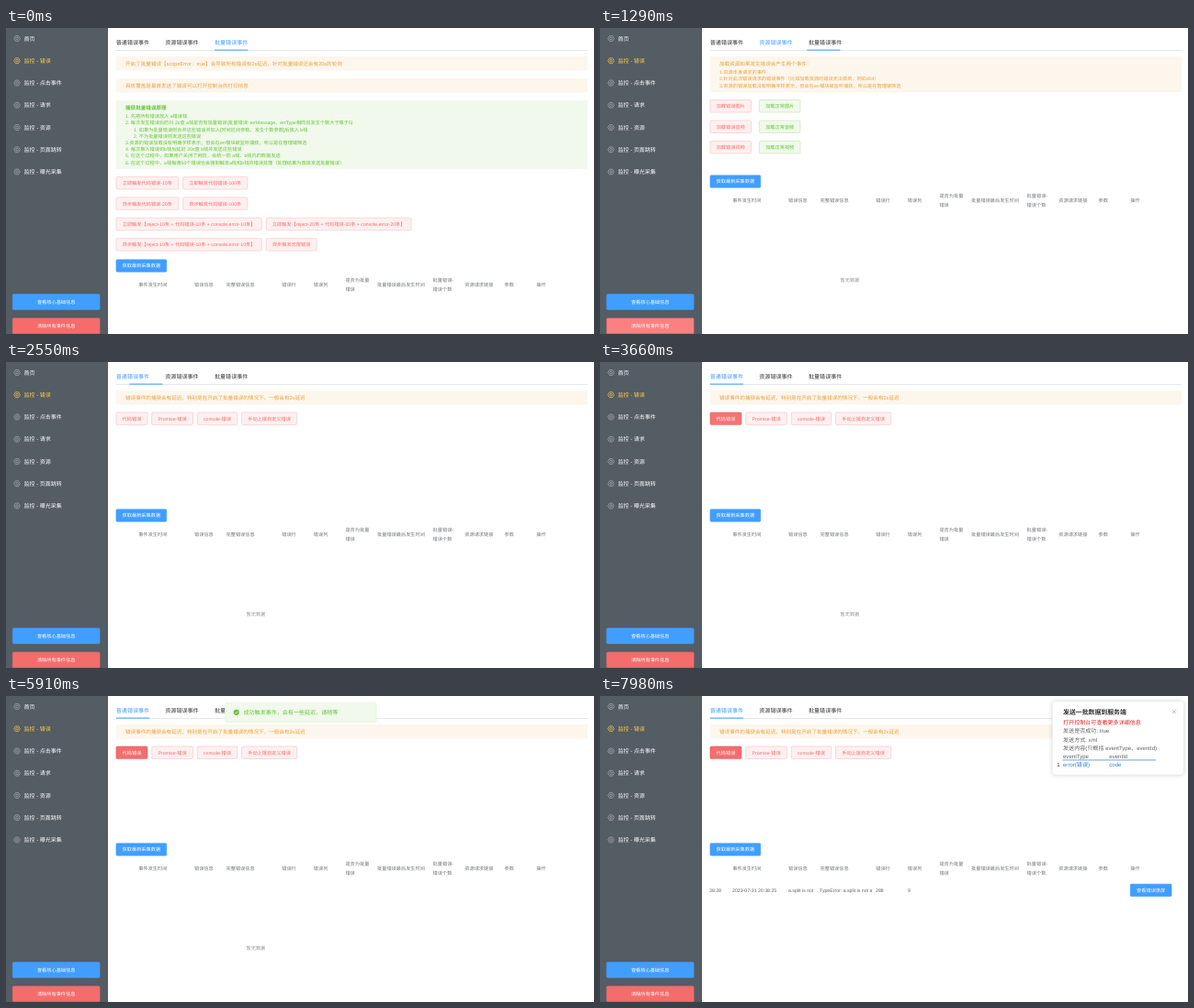
An HTML page that plays this animation: 640x334 px, repeating every 8000 ms.

```html
<!DOCTYPE html>
<html>
<head>
<meta charset="utf-8">
<style>
html, body { margin: 0; width: 100%; height: 100%; overflow: hidden; background: #fff; }
svg { display: block; width: 100vw; height: 100vh; }
text { font-family: "Liberation Sans", "Noto Sans CJK SC", "Noto Sans CJK", sans-serif; text-rendering: geometricPrecision; white-space: pre; }
</style>
</head>
<body>
<svg id="stage" viewBox="0 0 640 334"></svg>
<script>
const LOOP = 8000;
const BLUE = '#409eff', RED = '#f56c6c', GREEN = '#67c23a', ORANGE = '#e6a23c', DARK = '#303133', GREY = '#73767a';
const SMALL = 5.2, BODY = 5.58, MENU = 6;
const stage = document.getElementById('stage');

function add(parent, tag, attrs, content) {
  const node = document.createElementNS('http://www.w3.org/2000/svg', tag);
  for (const key in attrs) node.setAttribute(key, attrs[key]);
  if (content !== undefined) node.textContent = content;
  parent.appendChild(node);
  return node;
}
const group = (parent, attrs = {}) => add(parent, 'g', attrs);
const rect = (parent, x, y, width, height, fill, more = {}) =>
  add(parent, 'rect', { x, y, width, height, fill, ...more });

// y is the visual middle of the line
function label(parent, x, y, content, size, fill, more = {}) {
  return add(parent, 'text', { x, y: y + size * 0.37, 'font-size': size, fill, ...more }, content);
}

const KINDS = {
  primary: [BLUE, BLUE, '#fff'],
  danger: [RED, RED, '#fff'],
  plainRed: ['#fef0f0', '#fab6b6', RED],
  plainGreen: ['#f0f9eb', '#b3e19d', GREEN]
};
function button(parent, left, right, mid, kind, content, height = 13.5) {
  const [fill, stroke, ink] = KINDS[kind];
  const box = rect(parent, left + 0.2, mid - height / 2, right - left - 0.4, height, fill,
    { rx: 1.2, stroke, 'stroke-width': 0.5 });
  const text = label(parent, (left + right) / 2, mid, content, SMALL, ink,
    { 'text-anchor': 'middle', 'font-weight': ink === '#fff' ? 500 : 400 });
  return { box, text };
}
function alertBox(parent, top, height, fill) {
  rect(parent, 119.7, top, 513.5, height, fill, { rx: 1.4 });
}

// Sidebar
rect(stage, 0, 0, 640, 334, '#fff');
rect(stage, 0, 0, 111, 334, '#545c64');
['首页', '监控 - 错误', '监控 - 点击事件', '监控 - 请求', '监控 - 资源', '监控 - 页面跳转', '监控 - 曝光采集']
  .forEach((name, i) => {
    const y = 11.5 + i * 24.25, active = i === 1;
    const icon = group(stage, { transform: `translate(12 ${y})`, fill: 'none',
      stroke: active ? '#ffd04b' : '#aeb3b8', 'stroke-width': 0.65, 'stroke-linejoin': 'round' });
    add(icon, 'path', { d: 'M-1.6-2.9H1.6L3.3 0L1.6 2.9H-1.6L-3.3 0Z' });
    add(icon, 'circle', { r: 1.3 });
    label(stage, 19.5, y, name, MENU, active ? '#ffd04b' : '#fff');
  });
button(stage, 7, 102.3, 299, 'primary', '查看核心基础信息', 16.8);
const clear = button(stage, 7, 102.3, 325.2, 'danger', '清除所有事件信息', 16.8);

// Tabs
rect(stage, 119.7, 24, 513.5, 0.8, '#dfe3e9');
const TAB_X = [119.8, 173.3, 227];
const tabs = ['普通错误事件', '资源错误事件', '批量错误事件']
  .map((name, i) => label(stage, TAB_X[i], 16.2, name, 6.05, DARK));
const bar = rect(stage, 227, 23.6, 36.2, 1, BLUE);

// Common errors
const common = group(stage);
alertBox(common, 31, 15.5, '#fdf6ec');
label(common, 130, 38.8, '错误事件的捕获会有延迟，特别是在开启了批量错误的情况下，一般会有2s延迟', BODY, ORANGE);
const codeButton = button(common, 119.7, 154.2, 61.7, 'plainRed', '代码错误');
button(common, 158.5, 203.7, 61.7, 'plainRed', 'Promise-错误');
button(common, 208, 252, 61.7, 'plainRed', 'console-错误');
button(common, 256.2, 317, 61.7, 'plainRed', '手动上报自定义错误');

// Resource errors
const resource = group(stage);
alertBox(resource, 31, 39, '#fdf6ec');
label(resource, 130, 39, '加载资源如果发生错误会产生两个事件：', BODY, ORANGE);
['1.资源本身请求的事件',
  '2.针对此次错误请求的错误事件（比如加载资源的错误无法做到，例如404）',
  '3.资源的错误加载没有明确字样表示，但会在err模块被监听捕获，所以是在管理端筛选']
  .forEach((line, i) => label(resource, 130, 48.2 + i * 7.2, line, SMALL, ORANGE));
['图片', '音频', '视频'].forEach((media, i) => {
  const y = 85.3 + i * 22.4;
  button(resource, 119.7, 164.7, y, 'plainRed', '加载错误' + media);
  button(resource, 173.2, 218.2, y, 'plainGreen', '加载正常' + media);
});

// Batch errors
const batch = group(stage);
alertBox(batch, 31, 15.5, '#fdf6ec');
label(batch, 130, 38.8, '开启了批量错误【scopeError：true】会导致所有错误有2s延迟，针对批量错误还会有20s的轮询', BODY, ORANGE);
alertBox(batch, 55, 15.5, '#fdf6ec');
label(batch, 130, 62.8, '具体覆盖是最首发送了错误可以打开控制台的打印信息', BODY, ORANGE);
alertBox(batch, 79, 75, '#f0f9eb');
label(batch, 130, 87, '捕获批量错误原理', BODY, GREEN, { 'font-weight': 700 });
[[0, '1. 先把所有错误放入 a错误栈'],
  [0, '2. 每次发生错误后防抖 2s查 a栈是否有批量错误(批量错误: errMessage、errType相同且发生个数大于等于5)'],
  [9, '1. 如果为批量错误则合并这些错误并加入[时间区间参数、发生个数参数]后放入 b栈'],
  [9, '2. 不为批量错误则发送这些错误'],
  [0, '3.资源的错误加载没有明确字样表示，但会在err模块被监听捕获，所以是在管理端筛选'],
  [0, '4. 每次推入错误到b栈后延迟 20s查 b栈并发送这些错误'],
  [0, '5. 在这个过程中，如果用户关闭了网页，会统一把 a栈、b栈内的数据发送'],
  [0, '6. 在这个过程中，a栈每满50个错误也会强制触发a栈和b栈的错误处理（处理结果为直接发送批量错误）']]
  .forEach(([indent, line], i) => label(batch, 130 + indent, 96.4 + i * 7.17, line, SMALL, GREEN));
const mixed = n => `触发【reject-${n}条 + 代码错误-${n}条 + console.error-${n}条】`;
[['立即触发代码错误-10条', '立即触发代码错误-100条', 188, 192.5, 263],
  ['异步触发代码错误-20条', '异步触发代码错误-100条', 188, 192.5, 263],
  ['立即' + mixed(10), '立即' + mixed(20), 278.5, 283, 441.3],
  ['异步' + mixed(10), '异步触发无限错误', 278.5, 283, 338.3]]
  .forEach(([a, b, end, start, right], i) => {
    const y = 169.2 + i * 22.4;
    button(batch, 119.7, end, y, 'plainRed', a);
    button(batch, start, right, y, 'plainRed', b);
  });

// Table
const table = group(stage);
button(table, 119.7, 175, 167.5, 'primary', '获取最新采集数据');
[[144.3, '事件发生时间'], [205, '错误信息'], [239.5, '完整错误信息'], [300.2, '错误行'], [334.8, '错误列'],
  [369.4, '是否为批量', '错误'], [404, '批量错误最后发生时间'], [464.6, '批量错误-', '错误个数'],
  [499.3, '资源请求链接'], [542.6, '参数'], [577.2, '操作']]
  .forEach(([x, first, second]) => {
    label(table, x, second ? 183.2 : 188, first, SMALL, GREY);
    if (second) label(table, x, 193, second, SMALL, GREY);
  });
const empty = label(table, 261.5, 274.6, '暂无数据', SMALL, '#909399');
const row = group(table);
function cell(x, width, content) {
  const id = 'cell' + x;
  rect(add(row, 'clipPath', { id }), x, 205, width, 14, '#000');
  label(row, x, 212.2, content, SMALL, '#606266', { 'clip-path': `url(#${id})` });
}
cell(119, 18, '38:28');
cell(144, 56, '2023-07-31 20:38:25');
cell(205, 28, 'a.split is not a function');
cell(239, 57, 'TypeError: a.split is not a function');
cell(300, 20, '288');
cell(335, 20, '9');
button(row, 577, 622.3, 212, 'primary', '查看错误录屏');

// Success message
const toast = group(stage);
rect(toast, 238.5, 7.4, 164.5, 21.4, '#f0f9eb', { rx: 1.5, stroke: '#e1f3d8', 'stroke-width': 0.6 });
add(toast, 'circle', { cx: 250.7, cy: 17.8, r: 3.1, fill: GREEN });
add(toast, 'path', { d: 'M249.2 17.8l1.1 1.1l2-2.1', fill: 'none', stroke: '#fff', 'stroke-width': 0.7 });
label(toast, 258.5, 17.8, '成功触发事件，会有一些延迟，请稍等', 6.05, GREEN);

// Notification
const notice = group(stage);
rect(notice, 492.4, 6, 143, 80, '#fff',
  { rx: 3, stroke: '#e4e7ed', 'stroke-width': 0.5, style: 'filter:drop-shadow(0 0 2.5px rgba(0,0,0,.16))' });
label(notice, 504, 17, '发送一批数据到服务端', 6.9, DARK, { 'font-weight': 700 });
add(notice, 'path', { d: 'M623 15.2l4 4m0-4l-4 4', stroke: '#909399', 'stroke-width': 0.6 });
[['打开控制台可查看更多详细信息', '#e02020'], ['发送是否成功: true', '#606266'],
  ['发送方式: xml', '#606266'], ['发送内容(只概括 eventType、eventId)', '#606266']]
  .forEach(([line, ink], i) => label(notice, 504, 29 + i * 9.2, line, 6.07, ink));
[['eventType', 'eventId', 65.6, '#606266'], ['error(错误)', 'code', 75, '#337ecc']]
  .forEach(([a, b, y, ink]) => {
    label(notice, 504, y, a, 6.07, ink);
    label(notice, 554.3, y, b, 6.07, ink);
  });
label(notice, 497.2, 75, '1', 6.07, DARK);
rect(notice, 503.6, 69.6, 101.6, 0.7, '#337ecc');

// Motion
function bezier(x1, y1, x2, y2) {
  const at = (a, b, s) => 3 * a * s * (1 - s) ** 2 + 3 * b * s * s * (1 - s) + s ** 3;
  return x => {
    let low = 0, high = 1;
    for (let i = 0; i < 24; i++) {
      const s = (low + high) / 2;
      if (at(x1, x2, s) < x) low = s; else high = s;
    }
    return at(y1, y2, (low + high) / 2);
  };
}
const ease = bezier(0.25, 0.1, 0.25, 1);
const inOut = bezier(0.645, 0.045, 0.355, 1);
const ramp = (t, from, to, curve = ease) =>
  t <= from ? 0 : t >= to ? 1 : curve((t - from) / (to - from));
const channels = hex => [1, 3, 5].map(i => parseInt(hex.slice(i, i + 2), 16));
function mix(a, b, k) {
  const from = channels(a), to = channels(b);
  return `rgb(${from.map((v, i) => Math.round(v + (to[i] - v) * k))})`;
}
const show = (node, on) => node.setAttribute('display', on ? 'inline' : 'none');

const TO_RESOURCE = 1245, TO_COMMON = 2375, ROW_IN = 6780;

function draw(t) {
  show(batch, t < TO_RESOURCE);
  show(resource, t >= TO_RESOURCE && t < TO_COMMON);
  show(common, t >= TO_COMMON);
  table.setAttribute('transform', `translate(0 ${t < TO_RESOURCE ? 92 : 0})`);
  show(empty, t < ROW_IN);
  show(row, t >= ROW_IN);

  const toResource = ramp(t, TO_RESOURCE, TO_RESOURCE + 300, inOut);
  const toCommon = ramp(t, TO_COMMON, TO_COMMON + 300, inOut);
  bar.setAttribute('x', TAB_X[2] + (TAB_X[1] - TAB_X[2]) * toResource + (TAB_X[0] - TAB_X[1]) * toCommon);
  [ramp(t, 2150, 2300),
    ramp(t, 950, 1100) - ramp(t, TO_COMMON, TO_COMMON + 150),
    1 - ramp(t, TO_RESOURCE, TO_RESOURCE + 40)]
    .forEach((k, i) => tabs[i].setAttribute('fill', mix(DARK, BLUE, k)));

  const glow = ramp(t, 1180, 1280) - ramp(t, 1300, 1530);
  clear.box.setAttribute('fill', mix(RED, '#fb8080', glow));

  const hover = ramp(t, 3560, 3700);
  codeButton.box.setAttribute('fill', mix('#fef0f0', RED, hover));
  codeButton.box.setAttribute('stroke', mix('#fab6b6', '#dd6161', hover));
  codeButton.text.setAttribute('fill', mix(RED, '#ffffff', hover));

  const gone = ramp(t, 6685, 6925);
  const lift = 1 - ramp(t, 4120, 4520) + gone;
  toast.setAttribute('transform', `translate(0 ${-22 * lift})`);
  toast.setAttribute('opacity', ramp(t, 4120, 4420) - gone);

  const slide = ramp(t, 6810, 7110);
  show(notice, slide > 0);
  notice.setAttribute('transform', `translate(${143 * (1 - slide)} 0)`);
}

const start = performance.now();
function tick() {
  draw((performance.now() - start) % LOOP);
  requestAnimationFrame(tick);
}
tick();
</script>
</body>
</html>
```
